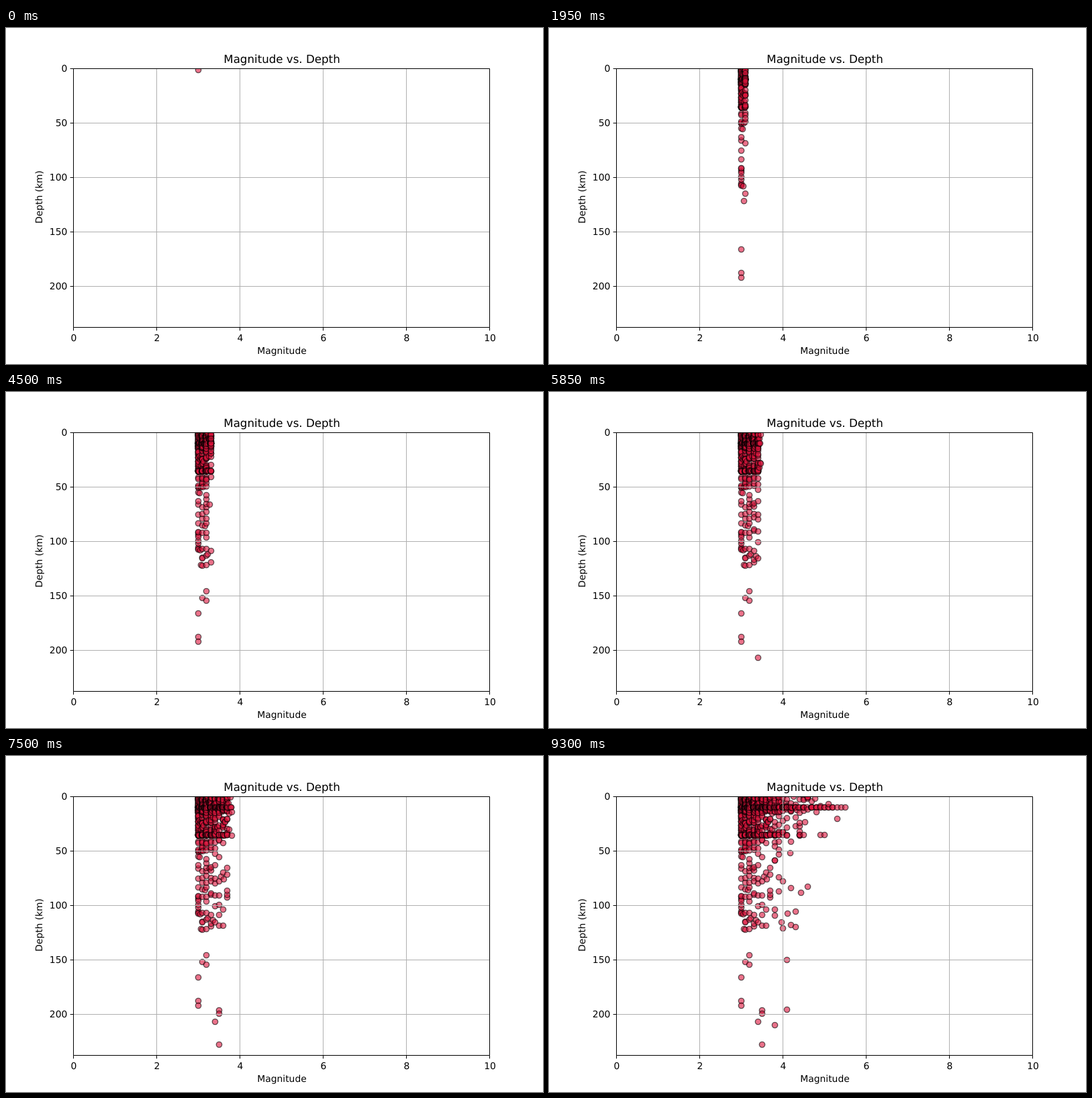
Animation of 800 by 500 pixels, one loop 9.45 s. Source, as an HTML page with a canvas:

```html
<!DOCTYPE html>
<html lang="en">
<head>
<meta charset="utf-8">
<title>Magnitude vs. Depth</title>
<style>
  html, body { margin: 0; width: 100%; height: 100%; overflow: hidden; background: #fff; }
  canvas, svg { position: absolute; left: 0; top: 0; width: 800px; height: 500px; }
  text { font: 13.89px "DejaVu Sans", sans-serif; text-anchor: middle; text-rendering: geometricPrecision; }
  .title { font-size: 16.67px; }
  .depth { text-anchor: end; }
  path { fill: none; stroke: #000; stroke-width: 1; }
  .grid { stroke: #b0b0b0; }
</style>
</head>
<body>
<canvas width="800" height="500"></canvas>
<svg viewBox="0 0 800 500">
  <path class="grid" id="grid"/>
  <path id="ticks"/>
  <path d="M100.5 60.5H720.5V445.5H100.5Z"/>
  <g id="labels"></g>
  <text class="title" x="411" y="52">Magnitude vs. Depth</text>
  <text x="411" y="485">Magnitude</text>
  <text transform="translate(54 251.5) rotate(-90)">Depth (km)</text>
</svg>
<script>
const STEP = 150, FRAMES = 63, PER_FRAME = 16;
const LEFT = 100, TOP = 60, WIDTH = 620, HEIGHT = 385;
const xOf = mag => LEFT + 62 * mag;
const yOf = depth => TOP + 1.62 * depth;

// Quakes arrive sorted by magnitude; their number decays exponentially with it.
const TOTAL = 62.37, DECAY = 2.05, HOLD = 0.8;

// Most magnitudes are whole tenths; a few slide between them.
function magAt(t) {
  const tenths = 10 * Math.log(TOTAL / (TOTAL - t)) / DECAY + 0.15;
  const whole = Math.floor(tenths);
  const slide = Math.max(0, (tenths - whole - HOLD) / (1 - HOLD));
  return 3 + (whole + slide) / 10;
}

const timeOf = mag => TOTAL * (1 - Math.exp(-DECAY * (mag - 2.975)));

let seed = 20417;
function rand() {
  seed = (seed * 1664525 + 1013904223) % 4294967296;
  return seed / 4294967296;
}

// Depths cluster at 10 and 35 km, the more at 10 the stronger the quake.
function depthFor(mag) {
  const kind = rand(), r = rand();
  if (rand() < 0.18 + 0.22 * (mag - 3)) return 10;
  if (kind < 0.1) return 35 + 0.6 * r;
  if (kind < 0.5) return 15 * r;
  if (kind < 0.84) return 36 * r;
  return 40 + 85 * r ** 1.4;
}

// The deepest quakes: [magnitude, depth]
const deepest = [
  [3, 166], [3, 187.5], [3, 192], [3.1, 152], [3.2, 145.7], [3.2, 154.5], [3.4, 207],
  [3.5, 196.5], [3.5, 199.5], [3.5, 228], [3.8, 210], [4.1, 150], [4.1, 195.5]
];

const points = [{ t: 0, mag: 3, depth: 1.2 }];
for (let i = 1; i < FRAMES * PER_FRAME - PER_FRAME + 1; i++) {
  const t = i / PER_FRAME, mag = magAt(t);
  points.push({ t, mag, depth: depthFor(mag) });
}
for (const [mag, depth] of deepest) points.push({ t: timeOf(mag), mag, depth });
points.sort((a, b) => a.t - b.t);

const ctx = document.querySelector("canvas").getContext("2d");
ctx.beginPath();
ctx.rect(LEFT, TOP, WIDTH, HEIGHT);
ctx.clip();
ctx.fillStyle = "rgba(220, 20, 60, 0.6)";
ctx.strokeStyle = "rgba(0, 0, 0, 0.6)";
ctx.lineWidth = 1.39;

function draw(frame) {
  ctx.clearRect(0, 0, 800, 500);
  for (const { t, mag, depth } of points) {
    if (t > frame) break;
    ctx.beginPath();
    ctx.arc(Math.round(xOf(mag)) + 0.5, Math.round(yOf(depth)) + 0.5, 4.17, 0, 2 * Math.PI);
    ctx.fill();
    ctx.stroke();
  }
}

function drawAxes() {
  let grid = "", ticks = "", labels = "";
  for (let mag = 0; mag <= 10; mag += 2) {
    const x = xOf(mag);
    grid += `M${x + 0.5} 60V445`;
    ticks += `M${x + 0.5} 445.5v4.86`;
    labels += `<text x="${x + 1}" y="466">${mag}</text>`;
  }
  for (let depth = 0; depth <= 200; depth += 50) {
    const y = Math.round(yOf(depth));
    grid += `M100 ${y + 0.5}H720`;
    ticks += `M100.5 ${y + 0.5}h-4.86`;
    labels += `<text class="depth" x="91.3" y="${y + 5}">${depth}</text>`;
  }
  document.getElementById("grid").setAttribute("d", grid);
  document.getElementById("ticks").setAttribute("d", ticks);
  document.getElementById("labels").innerHTML = labels;
}

let shown = -1;
function tick() {
  const frame = Math.floor(performance.now() / STEP) % FRAMES;
  if (frame !== shown) draw(shown = frame);
  requestAnimationFrame(tick);
}

drawAxes();
tick();
</script>
</body>
</html>
```
